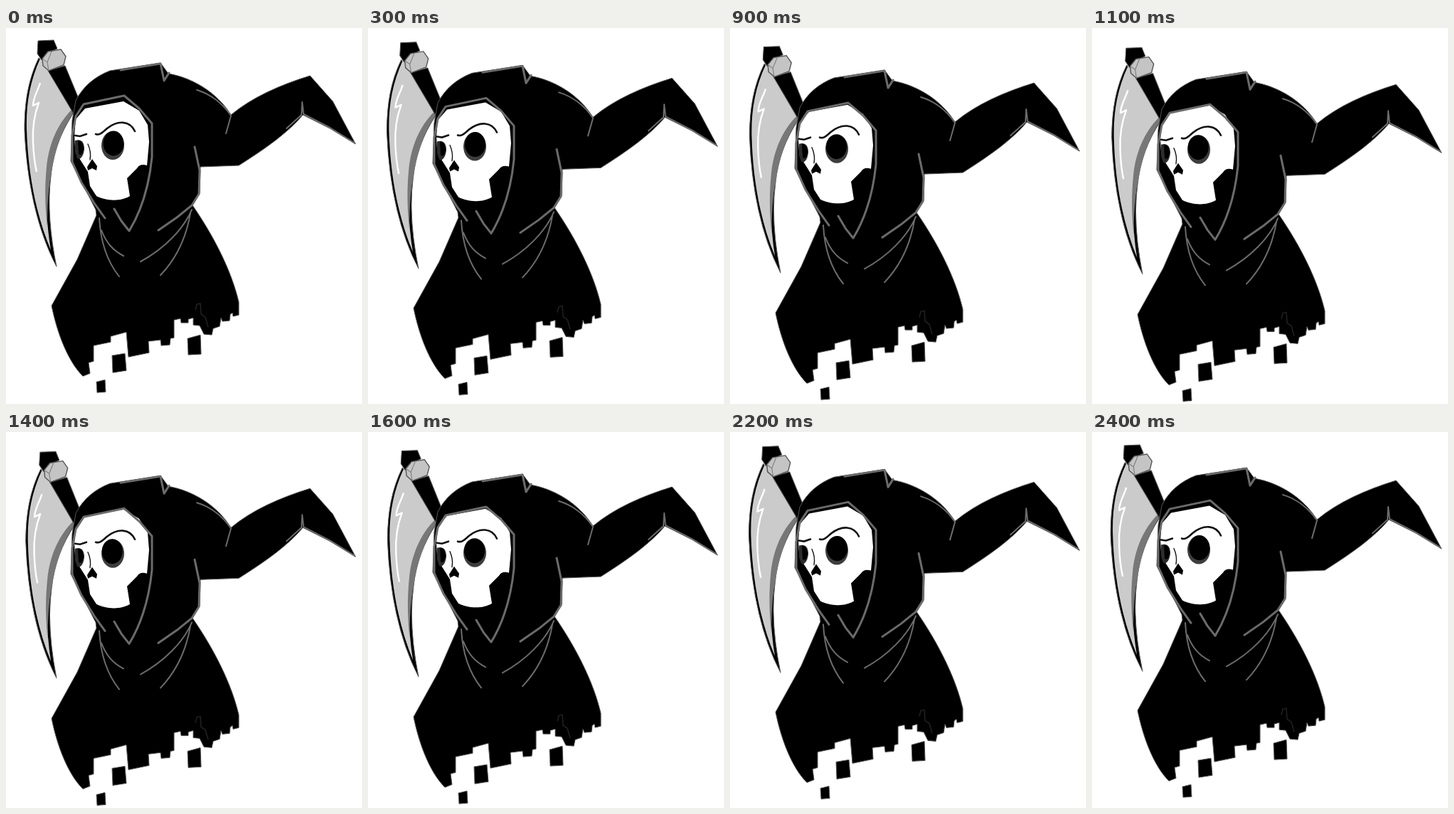
An HTML page for the animation above (2500 ms loop, 500 by 528 pixels).

```html
<!DOCTYPE html>
<html lang="en">
<head>
<meta charset="utf-8">
<title>Hooded reaper</title>
<style>
html, body { margin: 0; width: 100%; height: 100%; overflow: hidden; background: #fff; }
svg { display: block; width: 500px; height: 528px; }
.edge { stroke: #555; stroke-width: 1; stroke-linejoin: round; }
.fold { fill: none; stroke: #6b6b6b; stroke-width: 3; stroke-linecap: round; stroke-linejoin: round; }
.thin { stroke-width: 2; }
.ink { fill: none; stroke: #111; stroke-width: 2.6; stroke-linecap: round; }
.fine { stroke-width: 1.4; }
.shine { fill: none; stroke: #fff; stroke-width: 2.4; stroke-linejoin: round; }
</style>
</head>
<body>
<svg viewBox="0 0 500 528">
  <g id="scythe">
    <path d="M46 42C31 73 26 105 26 143C29 213 43 282 71 335C62 292 58 246 63 208C66 176 76 148 95 119L61 56Z" class="edge"/>
    <path d="M48 43C33 76 28 108 29 143C31 205 42 262 63 312C56 270 55 229 60 192C65 164 76 139 92 116L59 53Z" fill="#cbcbcb"/>
    <path d="M92 115C72 135 60 164 57 195C54 226 55 252 58 280C58 245 60 222 64 202C69 171 78 144 94 120Z" fill="#777"/>
    <path class="shine" d="M48 77C45 88 38 97 38 109L46 105C40 121 37 139 38 160Q39 184 43 202"/>
    <path d="M45 18L67 17L72 29L57 36L50 45L44 36Z" class="edge"/>
    <path d="M59 60L83 53L102 99L96 122Z" class="edge"/>
    <path d="M51 43L59 33L77 30L84 40L81 52L60 60L52 53Z" fill="#c4c4c4" stroke="#555" stroke-width="1.4"/>
    <path d="M51 43L58 48L64 33M58 48L60 60" fill="none" stroke="#777"/>
  </g>

  <g id="cloak">
    <path class="edge" d="M98 102C108 82 125 68 146 60L217 49L228 64C262 70 296 90 316 122
      C346 97 385 80 427 67L459 103L491 163L455 141L417 122C396 147 365 169 327 193L273 195L272 232L262 249
      C293 294 317 342 327 385L327 403L319 405L318 400L315 402L314 411L304 412L302 407L300 419L291 422L289 431L278 430L272 418L263 417L263 407L256 409L256 414L246 414L245 408L236 410L236 435L231 436L230 445L218 446L217 438L200 440L201 456L172 462L169 427L147 433L147 441L123 446L123 468L116 470L118 485L108 489
      C87 468 72 429 64 390L100 325L127 263L126 255L91 187L93 130Z"/>
    <path class="edge" d="M149 460L167 457L169 481L150 484ZM255 436L273 431L274 458L256 459ZM127 497L139 494L140 511L128 512Z"/>
    <path d="M266 396L268 388L273 387L274 402L280 406L284 420" fill="none" stroke="#222" stroke-width="1.5"/>
  </g>

  <g id="face">
    <path fill="#fff" d="M96 151L98 128L111 113L165 103L187 116L199 136L201 160L198 193Q188 190 184 197L170 211L174 236C159 245 139 242 127 236L118 222L115 202L103 183L97 168Z"/>
    <path d="M97 158C106 155 110 161 110 170C109 179 105 186 100 183L97 174Z" fill="#2c2c2c"/>
    <path d="M101 158C107 158 109 164 109 170C108 177 105 180 102 177Z"/>
    <ellipse cx="150" cy="165" rx="16" ry="20" fill="#3d3d3d"/>
    <ellipse id="pupil" cx="150" cy="162" rx="14.5" ry="17.5"/>
    <path d="M121 184L128 194L127 200L121 197L115 200L114 195Z"/>
    <path class="ink" d="M97 151L104 152L113 149M126 149C132 151 136 146 142 141C157 129 174 130 181 145"/>
    <path class="ink fine" d="M115 163Q120 174 118 185"/>
  </g>

  <g id="folds">
    <path class="fold" d="M98 124L109 107L166 95L187 113L205 134L205 181C201 222 190 257 173 285L162 271L152 254M98 124L93 151L93 188L106 217L124 246L139 267"/>
    <path class="fold" d="M161 59L217 50L222 74L229 63M265 167L272 200L271 233L261 249L240 266L214 284"/>
    <path class="fold thin" d="M268 87C288 93 305 107 316 123L309 148M394 141L415 122L416 104L418 121L455 140L489 161"/>
    <path class="fold thin" d="M131 267C133 304 143 329 159 349M134 284C141 302 150 312 165 320M261 255C249 283 222 310 189 328M259 260C253 295 240 323 217 347"/>
  </g>
</svg>
<script>
const LOOP = 2500, STEP = 100;
const part = id => document.getElementById(id);
const cloak = part("cloak"), folds = part("folds"), face = part("face");
const scythe = part("scythe"), pupil = part("pupil");
const shift = (el, y) => el.setAttribute("transform", `translate(0 ${y})`);

function draw(ms) {
  const phase = Math.floor((ms % LOOP) / STEP) * STEP / LOOP;
  const drop = 1 - Math.abs(1 - 2 * phase);
  shift(cloak, 14 * drop);
  shift(folds, 14 * drop);
  shift(face, 6.5 * drop);
  pupil.setAttribute("cx", 151 - 2 * drop);
  scythe.setAttribute("transform", `translate(0 ${12 * drop}) rotate(${0.6 * drop} 70 333)`);
}

const start = performance.now();
function tick() {
  draw(performance.now() - start);
  requestAnimationFrame(tick);
}
tick();
</script>
</body>
</html>
```
